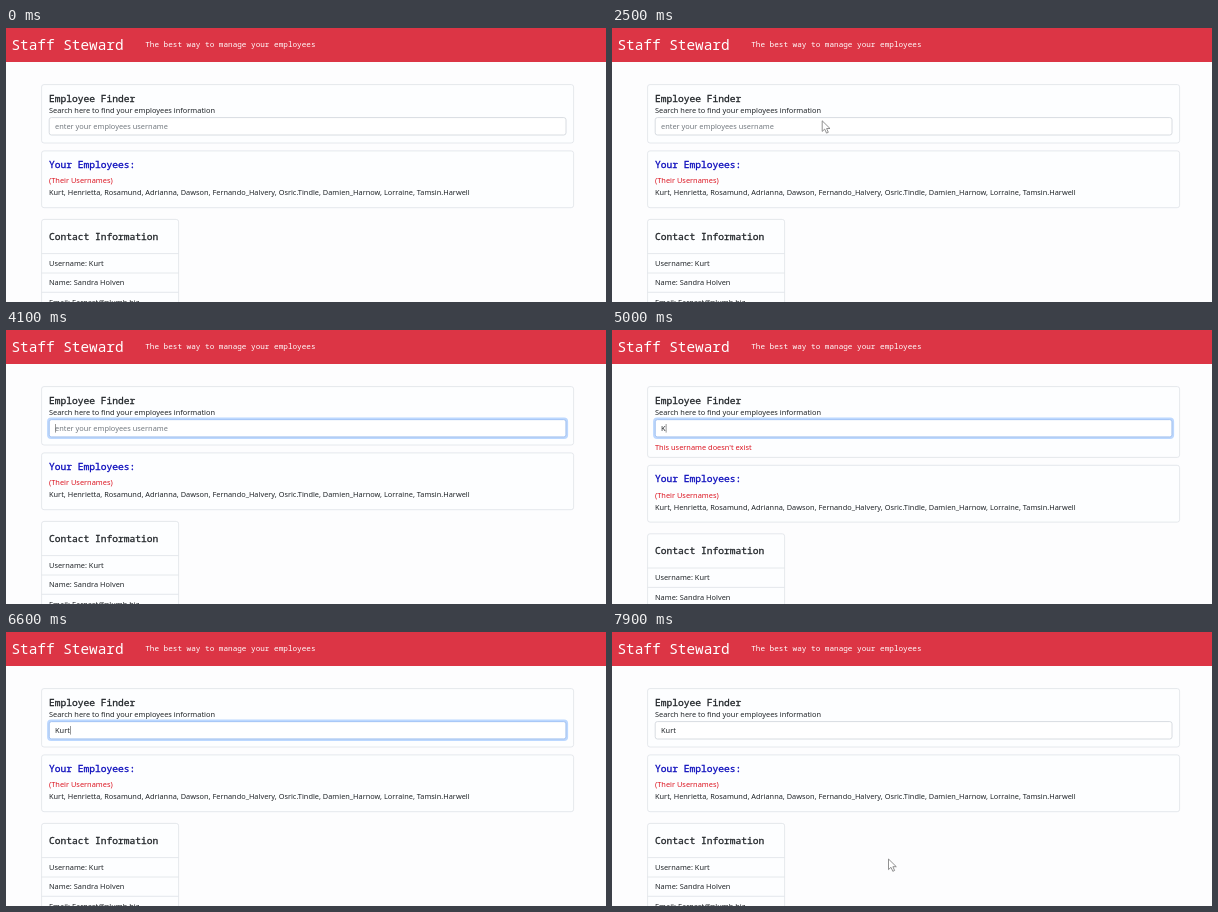
Write an HTML page that moves like this. It is 600x274 px and loops after 8000 ms.

```html
<!DOCTYPE html>
<html lang="en">
<head>
<meta charset="utf-8">
<title>Staff Steward</title>
<style>
  html, body { margin: 0; width: 100%; height: 100%; overflow: hidden; background: #fdfdfe; }
  svg { display: block; width: 100%; height: 100%; }
  text { font: 7.4px "Noto Sans", "Open Sans", sans-serif; fill: #212529; white-space: pre; }
  .mono { font-family: "Noto Sans Mono", "DejaVu Sans Mono", monospace; }
  .brand { font-size: 14.4px; fill: #fff; }
  .tag { font-size: 7.68px; fill: #fff; }
  .head { font-size: 9.6px; stroke: #212529; stroke-width: .3; }
  .blue { fill: #0c0cbc; stroke: #0c0cbc; }
  .red { fill: #dc1622; }
  .hint { fill: #747a80; }
  .names { font-size: 7.36px; }
  .card { fill: #fdfeff; stroke: #dfe3e8; stroke-width: .8; }
  .rule { stroke: #dfe3e8; stroke-width: .8; }
</style>
</head>
<body>
<svg viewBox="0 0 600 274">
  <rect width="600" height="274" fill="#fdfdfe"/>
  <rect width="600" height="34" fill="#dc3545"/>
  <text class="mono brand" x="5.4" y="21.8">Staff Steward</text>
  <text class="mono tag" x="139.2" y="19.3">The best way to manage your employees</text>

  <rect id="finder" class="card" x="35.6" y="56.6" width="532" height="58.4" rx="2.4"/>
  <text class="mono head" x="42.9" y="73.7">Employee Finder</text>
  <text x="43" y="85.2">Search here to find your employees information</text>
  <rect id="glow" x="42.2" y="88.6" width="518.8" height="19.4" rx="3" fill="none" stroke="#0d6efd" stroke-opacity=".27" stroke-width="2.2"/>
  <rect x="43.2" y="89.6" width="516.8" height="17.4" rx="2.2" fill="#fff" stroke="#ced4da" stroke-width=".8"/>
  <rect id="edge" x="43.2" y="89.6" width="516.8" height="17.4" rx="2.2" fill="none" stroke="#a0c5fc" stroke-width=".9"/>
  <text id="hint" class="hint" x="49" y="100.9">enter your employees username</text>
  <text id="value" x="49" y="100.9"></text>
  <rect id="caret" y="94" width=".6" height="8.6" fill="#555"/>
  <text id="error" class="red" x="43" y="120.2">This username doesn't exist</text>

  <g id="lower">
    <rect class="card" x="35.6" y="122.9" width="532" height="56.8" rx="2.4"/>
    <text class="mono head blue" x="42.9" y="139.6">Your Employees:</text>
    <text class="red" x="43" y="155.2">(Their Usernames)</text>
    <text class="names" x="43" y="167.4">Kurt, Henrietta, Rosamund, Adrianna, Dawson, Fernando_Halvery, Osric.Tindle, Damien_Harnow, Lorraine, Tamsin.Harwell</text>
    <rect class="card" x="35.6" y="191.4" width="137" height="120" rx="2.4"/>
    <text class="mono head" x="42.9" y="212">Contact Information</text>
    <path class="rule" d="M35.6 225.6h137M35.6 245h137M35.6 264.3h137"/>
    <text x="43" y="238">Username: Kurt</text>
    <text x="43" y="257.3">Name: Sandra Holven</text>
    <text x="43" y="276.6">Email: Earnest@plumb.biz</text>
  </g>

  <path id="mouse" d="M0 0V10.6L2.5 8.3L4.3 12.3L6.1 11.5L4.4 7.7H7.8Z" fill="#fff" stroke="#777" stroke-width=".8" stroke-linejoin="round"/>
</svg>
<script>
const LOOP = 8000;
const TICK = 100;
const SHIFT = 12.4;
const NAME = "Kurt";
const keyTimes = [4900, 5600, 5800, 6200];
const caretOn = [[3000, 3500], [4100, 4600], [4900, 5400], [5600, 6800], [7300, 7800]];
// Pointer trips: [time, x, y]
const trips = [
  [[1800, 420, 244], [2300, 239, 154], [2500, 210.2, 92.8], [2700, 203, 95]],
  [[7500, 250, 165], [7600, 276.5, 227], [8000, 276.5, 227]]
];

const $ = id => document.getElementById(id);
const clamp = v => Math.max(0, Math.min(1, v));
const ease = v => { v = clamp(v); return v * v * (3 - 2 * v); };
const within = (t, [a, b]) => t >= a && t < b;
const show = (id, on) => $(id).setAttribute("visibility", on ? "visible" : "hidden");

function pointerAt(t) {
  const trip = trips.find(p => within(t, [p[0][0], p[p.length - 1][0]]));
  if (!trip) return null;
  const i = trip.findIndex(p => p[0] > t);
  const [t0, x0, y0] = trip[i - 1], [t1, x1, y1] = trip[i];
  const k = (t - t0) / (t1 - t0);
  return [x0 + (x1 - x0) * k, y0 + (y1 - y0) * k];
}

function draw(ms) {
  const t = Math.floor(ms / TICK) * TICK;
  const typed = NAME.slice(0, keyTimes.filter(k => t >= k).length);
  const failed = within(t, [4900, 6600]);
  const focus = t < 5000 ? ease((t - 2920) / 230) : 1 - ease((t - 7740) / 140);

  $("glow").setAttribute("opacity", focus);
  $("edge").setAttribute("opacity", focus);
  $("value").textContent = typed;
  show("hint", !typed);
  const width = typed ? $("value").getComputedTextLength() : 0;
  $("caret").setAttribute("x", 49.2 + width);
  show("caret", caretOn.some(span => within(t, span)));

  show("error", failed);
  $("finder").setAttribute("height", 58.4 + (failed ? SHIFT : 0));
  $("lower").setAttribute("transform", `translate(0 ${failed ? SHIFT : 0})`);

  const at = pointerAt(t);
  show("mouse", at);
  if (at) $("mouse").setAttribute("transform", `translate(${at})`);
}

const start = performance.now();
function frame() {
  draw((performance.now() - start) % LOOP);
  requestAnimationFrame(frame);
}
frame();
</script>
</body>
</html>
```
